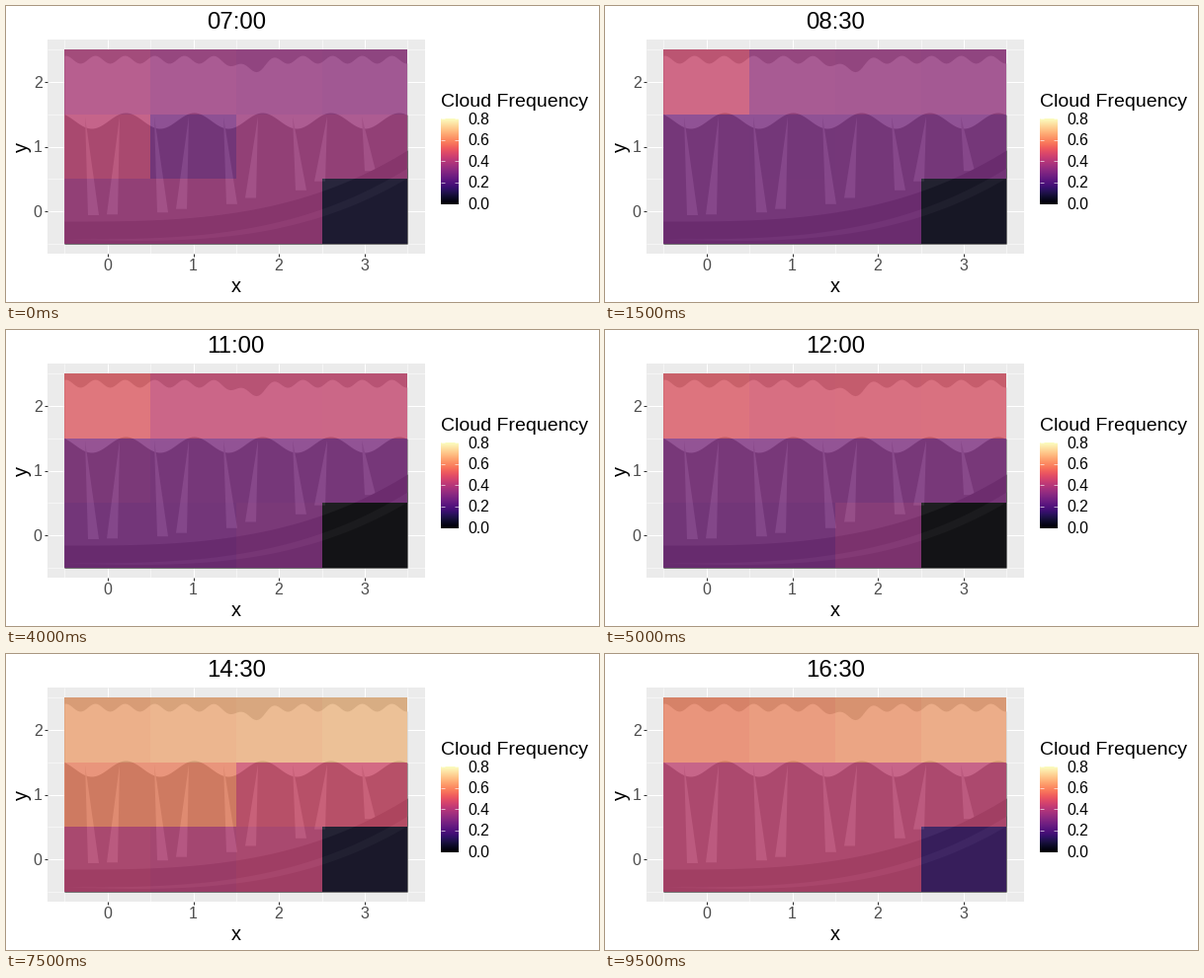
A matplotlib script that plays this animation: 600x300 px, repeating every 10 s.

```python
import numpy as np
import matplotlib.pyplot as plt
from matplotlib.animation import FuncAnimation
from matplotlib.patches import Polygon, Rectangle

plt.rcParams["font.family"] = "Liberation Sans"
PX = 0.72  # points per pixel at 100 dpi
FRAMES = 20
X0, X1, Y0, Y1 = 59.4, 406.4, 44, 241
X_EDGES = np.linspace(X0, X1, 5)
Y_EDGES = np.linspace(Y0, Y1, 4)
PANEL = (42, 34, 381.6, 216.8)

# Cloud level of each row of tiles through the day, as a share of the scale
LEVEL_TIMES = [0, 3, 10, 13, 15, 19]
TOP_LEVEL = [0.46, 0.45, 0.60, 0.65, 0.82, 0.74]
MID_LEVEL = [0.46, 0.36, 0.37, 0.44, 0.59, 0.55]
LOW_LEVEL = [0.46, 0.36, 0.35, 0.44, 0.54, 0.55]


def bump(x, center, width):
    return np.exp(-((x - center) / width) ** 2)


def tile_values(t):
    top, mid, low = (np.full(4, np.interp(t, LEVEL_TIMES, level))
                     for level in (TOP_LEVEL, MID_LEVEL, LOW_LEVEL))
    top += 0.002 * (t - 7) * np.arange(4)
    top[0] += 0.16 * bump(t, 5, 4)
    mid[0] += 0.08 * (bump(t, 0, 1.5) + bump(t, 6, 1.5))
    mid[1] -= 0.11 * bump(t, 0, 1.5)
    mid[:2] += 0.15 * bump(t, 15, 1)
    low[1] -= 0.10 * bump(t, 13, 1.5)
    low[2] += 0.07 * bump(t, 10, 2)
    low[3] = np.interp(t, [0, 8, 13, 19], [0.08, 0, 0, 0.18])
    return np.array([top, mid, low])


def clock(frame):
    minutes = 7 * 60 + 30 * frame
    return f"{minutes // 60:02d}:{minutes % 60:02d}"


fig = plt.figure(figsize=(6, 3), dpi=100, facecolor="white")
ax = fig.add_axes([0, 0, 1, 1])
ax.axis("off")


def label(x, y, text, size, color="black", **kw):
    kw.setdefault("va", "baseline")
    return ax.text(x, y, text, fontsize=size * PX, color=color, zorder=10, **kw)


def line(xs, ys, color="white", width=1.07, z=2):
    ax.plot(xs, ys, color=color, lw=width * PX, zorder=z,
            solid_capstyle="butt")


def box(x, y, w, h, color, z):
    ax.add_patch(Rectangle((x, y), w, h, fc=color, lw=0, zorder=z))


def draw_panel():
    left, top, width, height = PANEL
    right, bottom = left + width, top + height
    box(*PANEL, "#EBEBEB", 1)
    for i, x in enumerate(np.linspace(X0, X1, 9)):
        line([x, x], [top, bottom], width=1.07 if i % 2 else 0.53)
    for i, y in enumerate(np.linspace(Y1, Y0, 7)):
        line([left, right], [y, y], width=1.07 if i % 2 else 0.53)
    for i, x in enumerate((X_EDGES[1:] + X_EDGES[:-1]) / 2):
        line([x, x], [bottom, bottom + 2.75], "#333333")
        label(x - 0.4, 268, str(i), 16, "#4D4D4D", ha="center")
    for i, y in enumerate((Y_EDGES[1:] + Y_EDGES[:-1])[::-1] / 2):
        line([left - 2.75, left], [y, y], "#333333")
        label(36.6, y + 5.7, str(i), 16, "#4D4D4D", ha="right")
    label(233, 290, "x", 20, ha="center")
    label(16.3, 142.5, "y", 20, ha="center", va="center", rotation=90)


def draw_mountains():
    x = np.linspace(X_EDGES[0].round(), X_EDGES[-1].round(), 160)
    u = np.linspace(0, 1, x.size)

    def band(upper, lower, gray):
        ax.fill_between(x, upper, lower, color=str(gray), lw=0, zorder=3)

    ridge = 54 - 4 * np.cos(2 * np.pi * (x - 90) / 30) + 10 * bump(x, 247, 18)
    snow_line = 116 + 8 * np.sin(x / 11)
    valley = 218 - 72 * u ** 3
    band(Y0, Y1, 0.50)
    band(ridge, Y1, 0.76)
    band(snow_line, Y1, 0.40)
    # Snow chutes that widen downhill
    for i in range(9):
        top = 80 + 35 * i
        foot, bottom = top + 8 * (-1) ** i, 212 - 0.7 * i ** 2
        ax.add_patch(Polygon([(top, 112), (foot + 6, bottom),
                              (foot - 5, bottom)],
                             fc="0.62", lw=0, zorder=3))
    band(valley, Y1, 0.26)
    band(valley + 18, valley + 18 + 10 * u, 0.36)


def draw_legend():
    left, top, width, height = 440.3, 114.2, 17.28, 86.4
    label(440, 102, "Cloud Frequency", 19.5)
    ax.imshow(np.linspace(1, 0, 256)[:, None], cmap="magma", aspect="auto",
              extent=(left, left + width, top + height, top), zorder=3)
    for i in range(5):
        y = top + height * (1 - i / 4)
        for start in (left, left + width * 0.8):
            line([start, start + width * 0.2], [y, y], width=0.6, z=4)
        label(467, y + 5.5, f"{i * 0.2:.1f}", 15.8)


draw_panel()
draw_mountains()
draw_legend()
tiles = ax.pcolormesh(X_EDGES.round(), Y_EDGES.round(), tile_values(0),
                      cmap="magma", vmin=0, vmax=1, alpha=0.7, lw=0,
                      zorder=5)
title = label(232.8, 23, clock(0), 24, ha="center")
ax.set(xlim=(0, 600), ylim=(300, 0))


def update(frame):
    tiles.set_array(tile_values(frame))
    title.set_text(clock(frame))
    return tiles, title


anim = FuncAnimation(fig, update, frames=FRAMES, interval=500,
                     repeat=True, repeat_delay=0, blit=False)
plt.show()
```
